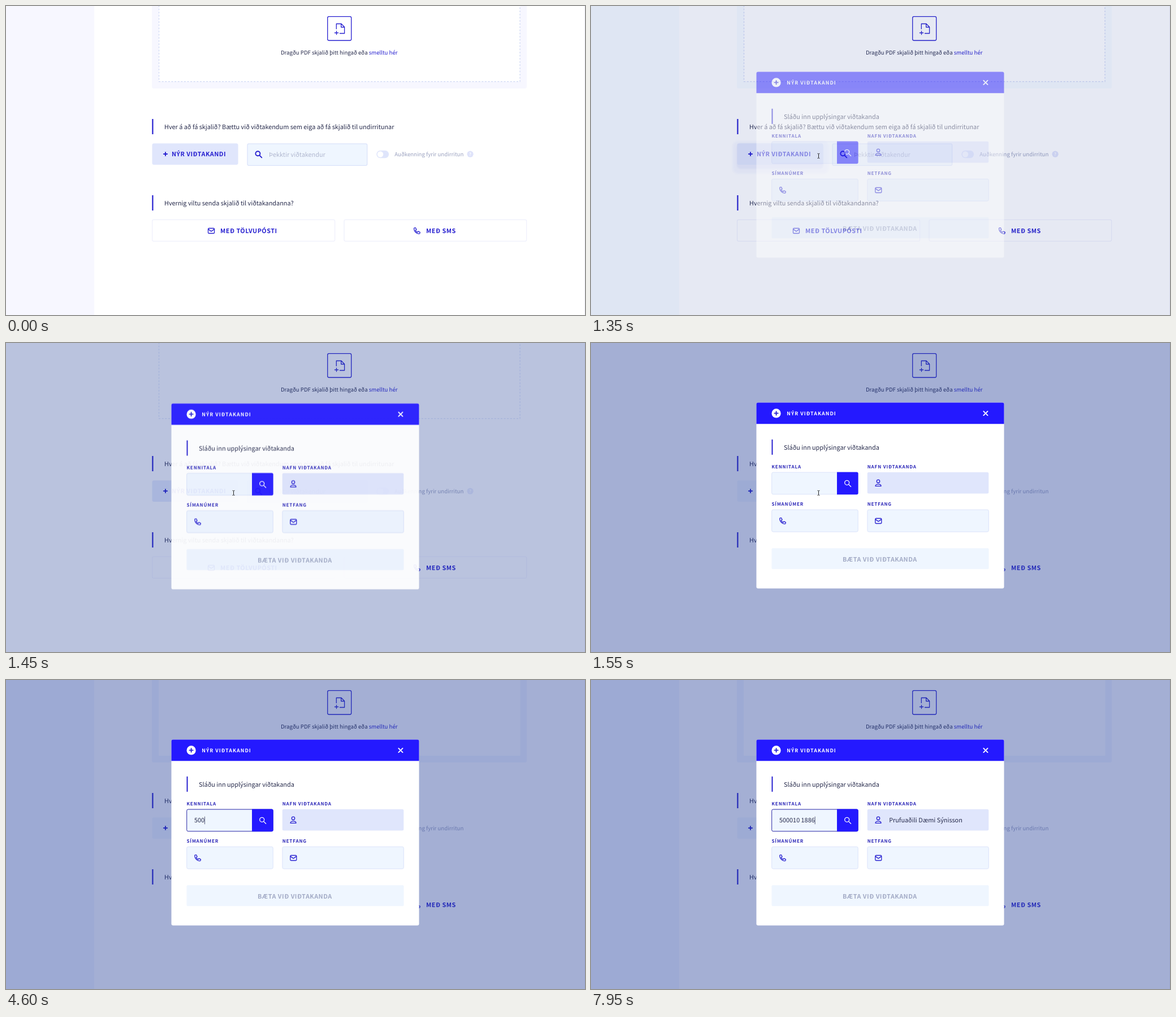
An HTML page for the animation above (8000 ms loop, 1024 by 547 pixels).

```html
<!DOCTYPE html>
<html lang="is">
<head>
<meta charset="utf-8">
<title>Nýr viðtakandi</title>
<style>
html, body { margin: 0; width: 100%; height: 100%; overflow: hidden; background: #fff; }
svg {
  display: block; width: 100%; height: 100%;
  --blue: #2720d0; --vivid: #2419ff; --pale: #eff6ff; --soft: #e0e6fc;
  font-family: "Noto Sans CJK JP", "Noto Sans CJK SC", "Noto Sans CJK", "Noto Sans", sans-serif;
  text-rendering: geometricPrecision;
}
text { font-size: 10.86px; fill: #262a4b; white-space: pre; }
.small { font-size: 9.64px; }
.link { fill: var(--blue); font-weight: 500; }
.muted { fill: #9aa1bf; }
.hint { fill: #b0b7cf; font-weight: 300; }
.btn { font-size: 10.8px; font-weight: 600; letter-spacing: .52px; fill: var(--blue); }
.off { fill: #a3abc6; }
.title { font-size: 8.85px; font-weight: 600; letter-spacing: 1.05px; fill: #fff; }
.label { font-size: 8.05px; font-weight: 600; letter-spacing: .85px; fill: #2b26b8; }
.bar { fill: var(--blue); }
.icon { fill: none; stroke: var(--blue); stroke-width: 1.3; stroke-linecap: round; stroke-linejoin: round; }
.heavy { stroke-width: 1.9; }
.white { stroke: #fff; }
.field { fill: var(--pale); stroke: #dbe3fa; }
.outline { fill: none; stroke: #eff0fc; stroke-width: 1.3; }

.tint, .ghost, .fresh, .hover, .veil, .modal, .focus, .arrow, .hand, .beam {
  animation: 8s linear infinite both;
}
.tint { fill: #f7f7ff; animation-name: tint; }
.ghost { animation-name: ghost; }
.fresh { fill: var(--soft); animation-name: fresh; }
.hover { animation-name: hover; }
.veil { fill: rgb(29, 57, 147); animation-name: veil; }
.modal { animation-name: modal; }
.focus { animation-name: focus; animation-timing-function: step-end; }
.arrow { animation-name: travel; }
.hand { animation-name: hand; animation-timing-function: step-end; }
.beam { animation-name: beam; animation-timing-function: step-end; }

@keyframes tint {
  0%, 11.25% { fill: #f7f7ff; }
  13%, 16.25% { fill: #eff6ff; }
  17.5%, 20% { fill: #fff; }
  20.625%, 100% { fill: #f3f6ff; }
}
@keyframes ghost { 0%, 17.5% { opacity: 1; } 19.375%, 100% { opacity: 0; } }
@keyframes fresh { 0%, 17.5% { fill: #e0e6fc; } 19.375%, 100% { fill: #f3f8ff; } }
@keyframes hover { 0%, 11% { opacity: 0; } 13.5%, 16.25% { opacity: 1; } 17.4%, 100% { opacity: 0; } }
@keyframes veil { 0%, 16.25% { opacity: 0; } 17.5% { opacity: .217; } 18.75% { opacity: .38; } 19.375%, 100% { opacity: .4; } }
@keyframes modal {
  0%, 16.1% { opacity: 0; transform: translateY(20px); }
  16.25% { opacity: .06; transform: translateY(19px); }
  17.5% { opacity: .85; transform: translateY(3.3px); }
  18.75%, 100% { opacity: 1; transform: none; }
}
@keyframes focus { 0% { opacity: 0; } 26.25%, 100% { opacity: 1; } }
@keyframes travel {
  0% { opacity: 0; transform: translate(994px, 330px); }
  .6% { opacity: 0; transform: translate(994px, 330px); }
  .625% { opacity: 1; transform: translate(994px, 330px); animation-timing-function: cubic-bezier(.45, 0, .3, 1); }
  10.9% { opacity: 1; transform: translate(402px, 261px); }
  10.95%, 100% { opacity: 0; transform: translate(402px, 261px); }
}
@keyframes hand { 0% { opacity: 0; } 10.95% { opacity: 1; } 16.1%, 100% { opacity: 0; } }
@keyframes beam { 0% { opacity: 0; } 16.1% { opacity: 1; } 49.4%, 100% { opacity: 0; } }
</style>
</head>
<body>
<svg viewBox="0 0 1024 547" preserveAspectRatio="none">
  <defs>
    <path id="plus" d="M0-3.1V3.1M-3.1 0H3.1"/>
    <path id="lens" d="M2.3 2.3 6 6M3.1-1A4 4 0 1 1-4.9-1A4 4 0 1 1 3.1-1Z"/>
    <path id="mail" d="M-4-4.5H4Q5.5-4.5 5.5-3V3Q5.5 4.5 4 4.5H-4Q-5.5 4.5-5.5 3V-3Q-5.5-4.5-4-4.5ZM-5-2.6 0 .9 5-2.6"/>
    <path id="phone" d="M-5.3-3.8C-5.3-4.8-4.6-5.3-3.8-5.3H-2.3L-.9-2.1-2.6-.9C-2 .7-.7 2 .9 2.6L2.1 .9 5.3 2.3V3.6C5.3 4.6 4.6 5.3 3.6 5.3-1 5.1-5.1 1-5.3-3.8Z"/>
    <path id="person" d="M-2.7-3A2.7 2.7 0 1 0 2.7-3A2.7 2.7 0 1 0-2.7-3ZM-5 5.5C-5 .9 5 .9 5 5.5Z"/>
  </defs>

  <!-- page -->
  <rect width="1024" height="547" fill="#fff"/>
  <rect class="tint" width="156" height="547"/>
  <rect x="1023" width="1" height="547" fill="#f1f1f8"/>
  <rect class="tint" x="258" y="-20" width="663" height="166" rx="3"/>
  <rect x="270" y="-20" width="639.5" height="154" fill="#fff"/>
  <rect class="ghost" x="270.5" y="-20" width="638.5" height="153.7" fill="none" stroke="#d6def6" stroke-width="1.5" stroke-dasharray="3.2 2.4"/>
  <rect class="icon" x="568.7" y="18.7" width="42" height="42.3" rx="2.5" stroke-width="1.5"/>
  <path class="icon" d="M584.3 40.5V31.5H593L598.6 37.2V48.5H590.5M592.7 31.7V37.5H598.4"/>
  <use href="#plus" class="icon" x="584.5" y="47.5"/>
  <text class="small" x="486" y="85.6">Dragðu PDF skjalið þitt hingað eða <tspan class="link">smelltu hér</tspan></text>

  <rect class="bar" x="258.3" y="200" width="2.2" height="27"/>
  <text x="280" y="218">Hver á að fá skjalið? Bættu við viðtakendum sem eiga að fá skjalið til undirritunar</text>
  <g class="hover">
    <rect x="250" y="239" width="171" height="58" rx="10" fill="#eceffe" style="filter:blur(1.5px)"/>
    <rect x="257.5" y="243" width="154" height="45.5" rx="8" fill="#d3d8f8" style="filter:blur(1px)"/>
  </g>
  <rect class="fresh" x="258.5" y="243.3" width="152" height="37.7" rx="3"/>
  <use href="#plus" class="icon heavy" x="282" y="262"/>
  <text class="btn" x="293" y="266.2">NÝR VIÐTAKANDI</text>
  <rect class="field" x="427" y="243.8" width="211.7" height="38.5" rx="2.5" stroke-width="1.3"/>
  <use href="#lens" class="icon heavy" x="446.3" y="262.3"/>
  <text class="hint" x="465" y="267">Þekktir viðtakendur</text>
  <rect x="655.3" y="255.8" width="21.8" height="13.4" rx="6.7" fill="#dfe5fb"/>
  <circle cx="662" cy="262.5" r="5.2" fill="#fff"/>
  <text class="small muted" x="687.3" y="266">Auðkenning fyrir undirritun</text>
  <g class="ghost">
    <circle cx="821" cy="262.2" r="5.6" fill="#dfe3fa"/>
    <text x="821" y="265" text-anchor="middle" style="font-size:7.5px;font-weight:700;fill:#fff">?</text>
  </g>

  <rect class="bar" x="258.3" y="335" width="2.2" height="27"/>
  <text x="280" y="353">Hvernig viltu senda skjalið til viðtakandanna?</text>
  <g class="ghost">
    <rect class="outline" x="258.6" y="378.3" width="323" height="38" rx="2.5"/>
    <rect class="outline" x="598" y="378.3" width="322.6" height="38" rx="2.5"/>
  </g>
  <use href="#mail" class="icon" x="363" y="398"/>
  <text class="btn" x="379" y="402.2">MEÐ TÖLVUPÓSTI</text>
  <use href="#phone" class="icon" x="726.8" y="398"/>
  <text class="btn" x="743" y="402.2">MEÐ SMS</text>

  <rect class="veil" width="1024" height="547"/>

  <!-- dialog -->
  <g class="modal">
    <rect x="292.5" y="105.5" width="438" height="329" rx="3" fill="#fff"/>
    <path d="M292.5 143.3V108.5Q292.5 105.5 295.5 105.5H727.5Q730.5 105.5 730.5 108.5V143.3Z" fill="var(--vivid)"/>
    <circle cx="327.6" cy="124.4" r="8.1" fill="#fff"/>
    <use href="#plus" class="icon heavy" x="327.6" y="124.4"/>
    <text class="title" x="346.3" y="128">NÝR VIÐTAKANDI</text>
    <path class="icon heavy white" d="M694.3 120.9 701.5 128.1M701.5 120.9 694.3 128.1"/>

    <rect class="bar" x="319.5" y="170.8" width="2" height="27"/>
    <text x="341" y="188.7">Sláðu inn upplýsingar viðtakanda</text>

    <text class="label" x="319.5" y="221.5">KENNITALA</text>
    <rect class="field" x="319.7" y="229" width="152.5" height="38.8" rx="2.5"/>
    <rect class="focus" x="319.7" y="229" width="152.5" height="38.8" rx="2.5" fill="none" stroke="#3430a8"/>
    <path d="M435 228.6H470Q472.6 228.6 472.6 231.2V265.6Q472.6 268.2 470 268.2H435Z" fill="var(--vivid)"/>
    <use href="#lens" class="icon white" x="453.6" y="248.3" stroke-width="1.6"/>
    <text id="number" x="333" y="252.4"></text>
    <rect id="caret" x="333" y="241.7" width=".9" height="13.6" fill="#4a4d6c"/>

    <text class="label" x="488.7" y="221.5">NAFN VIÐTAKANDA</text>
    <rect x="488.7" y="228.8" width="214.6" height="37.8" rx="2.5" fill="var(--soft)"/>
    <use href="#person" class="icon" x="508" y="247.8"/>
    <text id="name" x="527.2" y="252.4">Prufuaðili Dæmi Sýnisson</text>

    <text class="label" x="319.5" y="288">SÍMANÚMER</text>
    <rect class="field" x="319.7" y="295.2" width="152.5" height="39" rx="2.5"/>
    <use href="#phone" class="icon" x="339" y="315"/>
    <text class="label" x="488.7" y="288">NETFANG</text>
    <rect class="field" x="488.9" y="295.2" width="214.4" height="39" rx="2.5"/>
    <use href="#mail" class="icon" x="508.3" y="315"/>

    <rect x="319.5" y="363.3" width="384" height="37" rx="2" fill="var(--pale)"/>
    <text class="btn off" x="445" y="386.5">BÆTA VIÐ VIÐTAKANDA</text>
  </g>

  <!-- pointer -->
  <path class="arrow" d="M0 0V12L2.8 9.4 4.6 13.4 6.4 12.6 4.7 8.7H8.4Z" fill="#111" stroke="#fff" stroke-width=".8"/>
  <path class="hand" d="M401 270V261.5Q402 260 403 261.5V266L408 267.2Q409.3 268 408.8 270L407.6 274.5H402L398.4 269.8Q398.6 268 401 270Z" fill="#fff" stroke="#111" stroke-width=".9"/>
  <path class="beam" d="M400.6 261.2Q402.5 261.2 402.5 262.4Q402.5 261.2 404.4 261.2M402.5 262.4V268.4M400.6 269.6Q402.5 269.6 402.5 268.4Q402.5 269.6 404.4 269.6" fill="none" stroke="#222" stroke-width="1"/>
</svg>
<script>
const LOOP = 8000, FOCUS = 2100, TYPE = 4000, STEP = 265, NAME = 7100;
const digits = "500010 1886";
const [number, caret, name] = ["number", "caret", "name"].map(id => document.getElementById(id));
let start;

function draw(now) {
  start ??= now;
  const t = (now - start) % LOOP;
  const count = Math.max(0, Math.min(digits.length, Math.floor((t - TYPE) / STEP) + 1));
  const typed = digits.slice(0, count);
  if (number.textContent !== typed) number.textContent = typed;

  // The blink restarts with every key press.
  const last = count ? TYPE + (count - 1) * STEP : FOCUS;
  const lit = t >= FOCUS && (t - last) % 1000 < 500;
  const width = count ? number.getComputedTextLength() : 0;
  caret.setAttribute("x", 333 + width);
  caret.style.opacity = lit ? 1 : 0;
  name.style.opacity = t >= NAME ? 1 : 0;
  requestAnimationFrame(draw);
}
requestAnimationFrame(draw);
</script>
</body>
</html>
```
